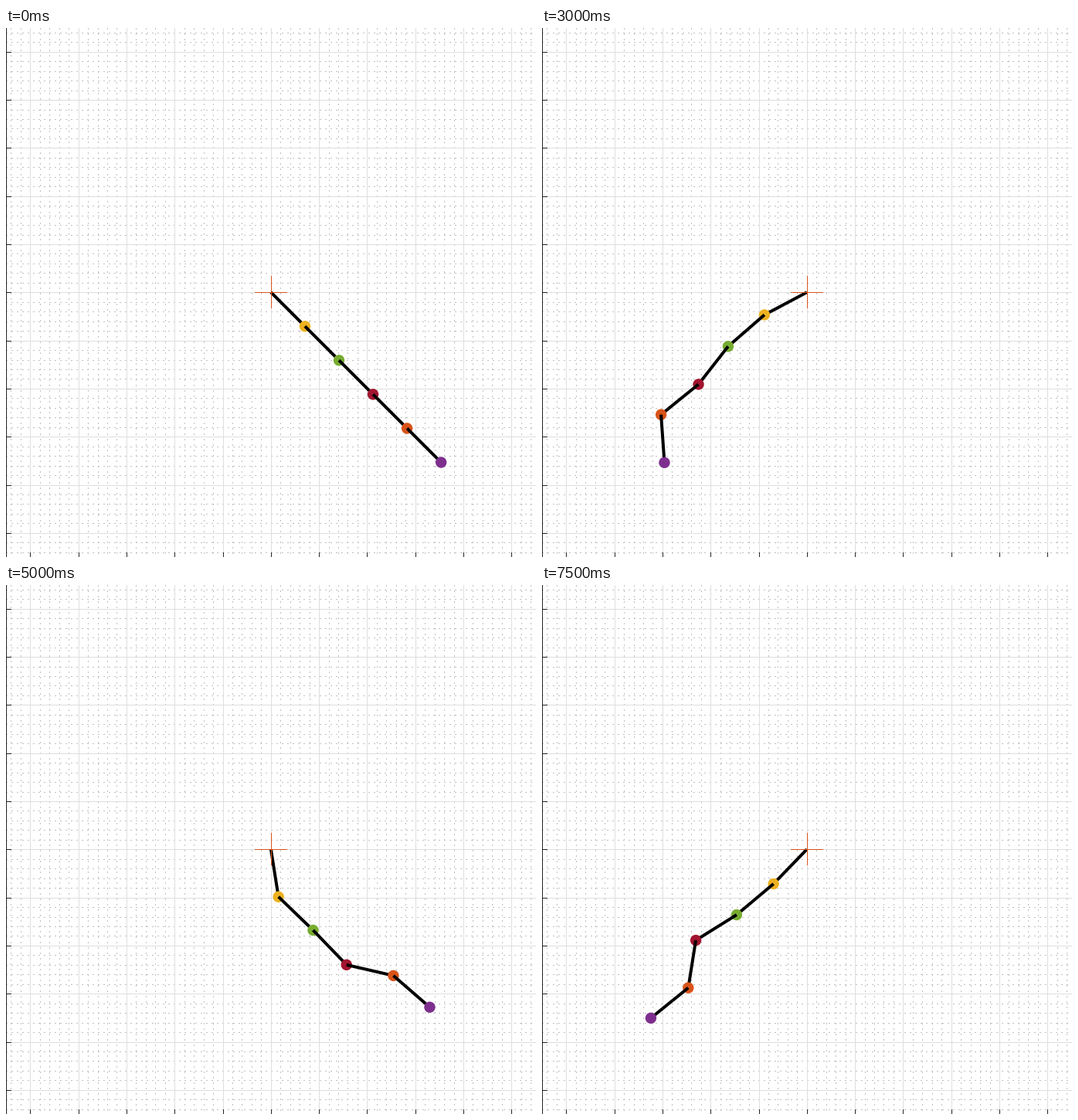
A matplotlib script that plays this animation: 686x685 px, repeating every 8000 ms.

```python
import numpy as np
import matplotlib.pyplot as plt
from matplotlib.animation import FuncAnimation
from matplotlib.patches import Circle

W, H, DPI = 686, 685, 64
PT = 72 / DPI                      # points per pixel
CELL = LINK = 62.3
OX, OY = 342.9, 342.2
STEPS = 16
COLORS = ["#EDB120", "#77AC30", "#A2142F", "#D95319", "#7E2F8E"]
ORANGE, INK, MAJOR, MINOR = "#D95319", "#262626", "#dedede", "#c0c0c0"

# Key poses: step -> link angles in degrees, counter-clockwise.
# One number means the chain is swung out straight.
KEYS = {
    0: -45, 1: -45, 2: 15, 3: 80,
    4: (153, 152, 155, 163, 144),
    6: (208, 221, 232, 219, 274),
    8: (216, 254, 292, 313, 332),
    10: (279, 316, 314, 347, 319),
    11: 326, 12: 382,
    13: (449, 466, 469, 442, 445),
    14: 555,
    15: (586, 580, 572, 621, 579),
}
KNOTS = np.array(list(KEYS), float)
POSES = np.array([np.broadcast_to(p, len(COLORS)) for p in KEYS.values()], float)
SLOPES = np.gradient(POSES, KNOTS, axis=0)


def angles(step):
    """Smooth cubic path through the key poses."""
    i = min(np.searchsorted(KNOTS, step, side="right"), len(KNOTS) - 1) - 1
    h = KNOTS[i + 1] - KNOTS[i]
    u = (step - KNOTS[i]) / h
    ease = u * u * (3 - 2 * u)
    return (POSES[i] + ease * (POSES[i + 1] - POSES[i])
            + h * u * (1 - u) * ((1 - u) * SLOPES[i] - u * SLOPES[i + 1]))


def chain(step):
    a = np.radians(angles(step))
    x = OX + LINK * np.append(0, np.cumsum(np.cos(a)))
    y = OY - LINK * np.append(0, np.cumsum(np.sin(a)))
    return x, y


fig = plt.figure(figsize=(W / DPI, H / DPI), dpi=DPI, facecolor="white")
ax = fig.add_axes([0, 0, 1, 1])
ax.set_xlim(0, W)
ax.set_ylim(H, 0)
ax.axis("off")


def stroke(x, y, color, width=1, **kw):
    return ax.plot(x, y, color=color, lw=width * PT, snap=False,
                   solid_capstyle="butt", dash_capstyle="butt", **kw)[0]


def pixel(v):
    return np.floor(v) + 0.5


def draw_axes():
    dots = dict(linestyle=(0, (1, 5)), antialiased=False, zorder=0)
    for k in range(-28, 29):
        x, y = pixel(343.3 + k * CELL / 5), pixel(342.8 + k * CELL / 5)
        style = dots if k % 5 else dict(zorder=1)
        color = MINOR if k % 5 else MAJOR
        stroke([x, x], [0, H], color, **style)
        stroke([0, W], [y, y], color, **style)
        if k % 5 == 0:
            stroke([x, x], [H - 6, H], INK, zorder=2)
            stroke([0, 7], [y, y], INK, zorder=2)
    stroke([0.5, 0.5], [0, H], INK, zorder=2)


draw_axes()

# Each joint covers the link before it; the next link starts on top of it
links, joints = [], []
for i, color in enumerate(COLORS):
    links.append(stroke([], [], "black", 4, zorder=3 + 2 * i))
    joints.append(ax.add_patch(Circle((OX, OY), 7.2, fc=color, lw=0,
                                      zorder=4 + 2 * i)))

stroke([343.5, 343.5], [321, 363], ORANGE, zorder=20)
stroke([322, 364], [342.5, 342.5], ORANGE, zorder=20)


def update(n):
    x, y = chain(n)
    for i, (link, joint) in enumerate(zip(links, joints)):
        link.set_data(x[i:i + 2], y[i:i + 2])
        joint.center = x[i + 1], y[i + 1]
    return links + joints


anim = FuncAnimation(fig, update, frames=STEPS, interval=500,
                     init_func=lambda: update(0), repeat=True, repeat_delay=0)
plt.show()
```
